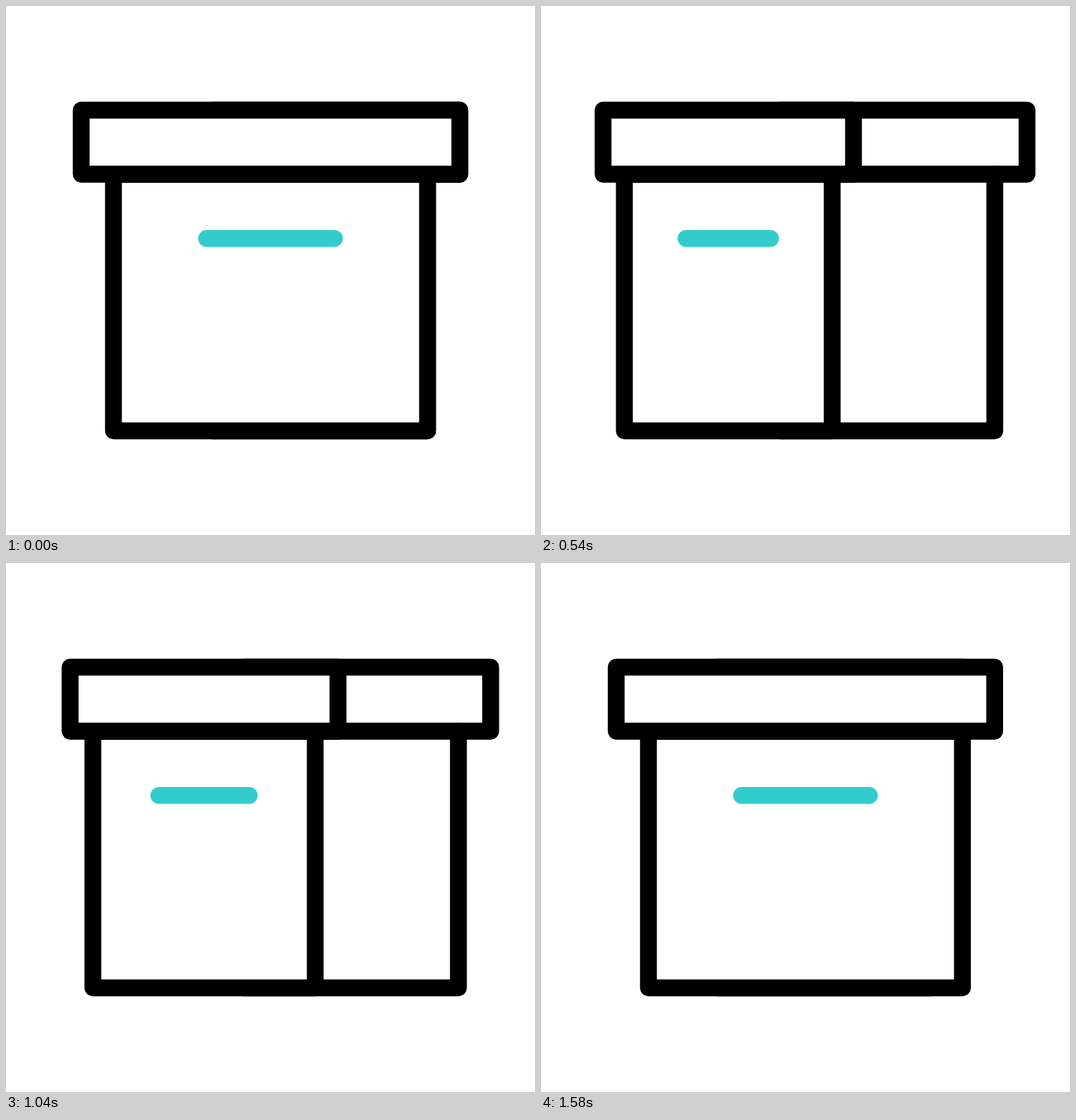
Write an HTML page with a canvas that moves like this. It is 640 px wide and 640 px high and loops after 2.4 s.

```html
<!DOCTYPE html>
<html lang="en">
<head>
<meta charset="utf-8">
<title>Archive box</title>
<style>
  html, body { margin: 0; width: 100%; height: 100%; overflow: hidden; background: #fff; }
  canvas { display: block; width: 640px; height: 640px; }
</style>
</head>
<body>
<canvas id="stage" width="640" height="640"></canvas>
<script>
const ctx = document.getElementById('stage').getContext('2d');
const LOOP = 2400;
const TIMES = [0, 480, 860, 1600];
const TOP = 126, RIM = 203.5, BASE = 514, LABEL = 281.2;

// Easing with flat ends; x1 and x2 are the handle positions in time.
function ease(x1, x2) {
  return x => {
    let lo = 0, hi = 1;
    for (let i = 0; i < 30; i++) {
      const s = (lo + hi) / 2, r = 1 - s;
      if (3 * r * r * s * x1 + 3 * r * s * s * x2 + s * s * s < x) lo = s;
      else hi = s;
    }
    return lo * lo * (3 - 2 * lo);
  };
}

const turn = ease(0.33, 0.61);
const drift = ease(0.33, 0.67);

function track(values, back) {
  const eases = [turn, drift, back];
  return t => {
    if (t >= TIMES[3]) return values[3];
    let i = 0;
    while (t >= TIMES[i + 1]) i++;
    const x = (t - TIMES[i]) / (TIMES[i + 1] - TIMES[i]);
    return values[i] + (values[i + 1] - values[i]) * eases[i](x);
  };
}

const squeeze = track([0, 1.008, 0.897, 0], ease(0.83, 0.52));
const shift = track([0, 1.008, 0.882, 0], ease(1, 0.49));
const sideX = track([0, 38.9, 40.5, -37], ease(0.8, 0.48));

function line(points, color = '#000') {
  ctx.beginPath();
  points.forEach(([x, y]) => ctx.lineTo(x, y));
  ctx.strokeStyle = color;
  ctx.stroke();
}

function panel(cx, half, top, bottom) {
  ctx.beginPath();
  ctx.rect(cx - half, top, half * 2, bottom - top);
  ctx.fill();
  ctx.strokeStyle = '#000';
  ctx.stroke();
}

// The left part of the side always stays behind the front.
function drawSide(x) {
  line([[250 + x, TOP], [549 + x, TOP], [549 + x, RIM], [250 + x, RIM]]);
  line([[510 + x, RIM], [510 + x, BASE], [250 + x, BASE]]);
}

function drawFront(cx, p) {
  panel(cx, 190 - 64.25 * p, RIM, BASE);
  panel(cx, 229 - 77.5 * p, TOP, RIM);
  const half = 77.5 - 26.25 * p;
  line([[cx - half, LABEL], [cx + half, LABEL]], '#33cccc');
}

function frame(now) {
  const t = now % LOOP;
  ctx.fillStyle = '#fff';
  ctx.fillRect(0, 0, 640, 640);
  ctx.lineWidth = 20.4;
  ctx.lineCap = ctx.lineJoin = 'round';
  drawSide(sideX(t));
  drawFront(320 - 93.5 * shift(t), squeeze(t));
  requestAnimationFrame(frame);
}

const start = performance.now();
frame(0);
function tick() { return Math.max(0, performance.now() - start); }
</script>
</body>
</html>
```
